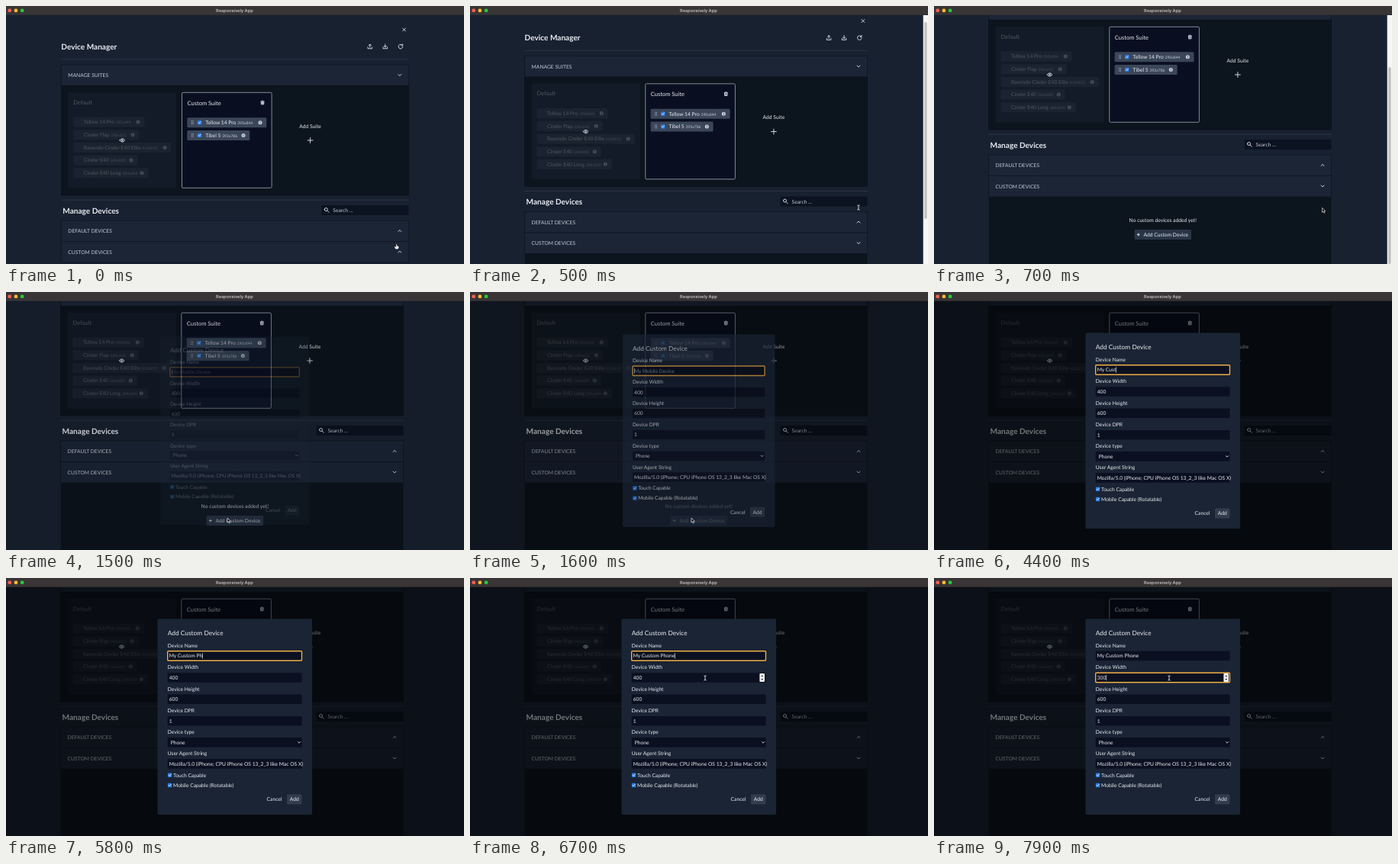
An HTML page for the animation above (8 s loop, 600 by 338 pixels).

```html
<!DOCTYPE html>
<html lang="en">
<head>
<meta charset="utf-8">
<title>Device manager</title>
<style>
  html, body { margin: 0; width: 100%; height: 100%; overflow: hidden; background: #182130; }
  svg { display: block; width: 600px; height: 338px; font-family: Lato, "Open Sans", sans-serif; }
  text { fill: #e8ecf2; white-space: pre; text-rendering: geometricPrecision; }
  .icon { fill: none; stroke: #e4e9f0; stroke-width: .9; stroke-linecap: round; stroke-linejoin: round; }
  .muted { fill: #c3cad5; }
</style>
</head>
<body>
<svg id="stage" viewBox="0 0 600 338"></svg>
<script>
const LOOP = 8000, SCROLL = 86, OPEN_AT = 300, MODAL_AT = 1450, WIDTH_FOCUS = 7000;
const stage = document.getElementById('stage');

// y is the vertical middle of the capitals
const text = (x, y, str, size = 6.72, attrs = '') =>
  `<text x="${x}" y="${y + size * .35}" font-size="${size}" ${attrs}>${str}</text>`;
const box = (x, y, w, h, fill, attrs = '') =>
  `<rect x="${x}" y="${y}" width="${w}" height="${h}" fill="${fill}" ${attrs}/>`;
const icon = (x, y, d, attrs = '') =>
  `<path class="icon" transform="translate(${x} ${y})" d="${d}" ${attrs}/>`;
const chevron = (x, y, down) => icon(x, y, down ? 'M-2-1L0 1 2-1' : 'M-2 1L0-1 2 1');
const check = (x, y) =>
  box(x - 2.7, y - 2.7, 5.4, 5.4, '#2b7de9', 'rx="1"') + icon(x, y, 'M-1.4 .1L-.4 1.2 1.4-1.2', 'stroke="#fff"');

function chip(x, y, w, name, dims, active) {
  const dots = [0, 1, 2, 3, 4, 5].map(i =>
    box(x + 5.6 + i % 2 * 1.8, y - 2.4 + (i >> 1) * 1.9, .9, .9, '#c9d0da')).join('');
  const end = x + w - 8.3;
  return box(x, y - 6.5, w, 13, '#3b4759', 'rx="1.5"') +
    (active ? dots + check(x + 16.2, y) : '') +
    text(x + (active ? 24 : 13.5), y, `${name}<tspan dx="1.8" font-size="5.04" fill="#c3cad5">${dims}</tspan>`) +
    `<circle cx="${end}" cy="${y}" r="2.5" fill="#cbd2dc"/>` +
    box(end - .4, y - .5, .8, 1.9, '#3b4759') + box(end - .4, y - 1.6, .8, .8, '#3b4759');
}

const header = (y, right, label, down) =>
  box(72, y, right - 72, 27.5, '#1b2535', 'stroke="#0e1622" stroke-width=".8"') +
  text(81, y + 13.7, label, 6.72, 'class="muted"') + chevron(right - 11.5, y + 13.5, down);

function page(open) {
  const right = open ? 521 : 527;
  const rule = y => box(72, y, right - 72, .6, '#354153');
  const suite = [
    ['Tellow 14 Pro', '390x844', 93], ['Cinder Flap', '280x653', 86],
    ['Ravendo Cinder E40 Elite', '412x915', 128], ['Cinder E40', '360x800', 84],
    ['Cinder E40 Long', '384x854', 98]
  ].map(([name, dims, w], i) => chip(88, 152 + i * 16.7, w, name, dims)).join('');

  return icon(right - 5.7, 31, 'M-1.9-1.9L1.9 1.9M1.9-1.9L-1.9 1.9') +
    text(72, 53.3, 'Device Manager', 10.08, 'font-weight="700"') +
    icon(right - 50.5, 53, 'M-2.8 1V2.8H2.8V1M0 1V-2.8M-1.6-1.3L0-2.9 1.6-1.3') +
    icon(right - 30.5, 53, 'M-2.8 1V2.8H2.8V1M0-2.9V.9M-1.6-.6L0 1 1.6-.6') +
    icon(right - 10.3, 53, 'M2.3-1.5A2.8 2.8 0 1 0 2.8 .4M2.7-3V-1.2H.9') +
    rule(69.7) +
    header(77, right, 'MANAGE SUITES', true) +
    box(72, 104.5, right - 72, 143.5, '#0c141d', 'stroke="#0a1019" stroke-width=".6"') +
    `<g opacity=".3">${box(81, 113, 142, 125.5, '#222d40', 'rx="1.5"')}${text(88, 126.3, 'Default', 7.56)}${suite}</g>` +
    icon(152, 176, 'M-3.4 0Q0-4.4 3.4 0Q0 4.4-3.4 0M-1 0A1 1 0 1 0 1 0A1 1 0 1 0-1 0') +
    box(230.2, 113.3, 117.6, 125, '#090f20', 'rx="1.5" stroke="#8f99a8" stroke-width=".9"') +
    text(237.2, 127, 'Custom Suite', 7.56) +
    icon(335.7, 126.7, 'M-1.7-1.3V2.2H1.7V-1.3M-2.1-1.5H2.1M-.7-2.4H.7M-.5-.2V1.2M.5-.2V1.2', 'stroke-width=".7"') +
    chip(237, 152.7, 104, 'Tellow 14 Pro', '390x844', true) +
    chip(237, 169.4, 82, 'Tibel 5', '393x786', true) +
    text(398.3, 157.5, 'Add Suite', 6.72, 'text-anchor="middle"') +
    icon(398.3, 176, 'M-3.4 0H3.4M0-3.4V3.4') +
    rule(253.8) +
    text(74, 268, 'Manage Devices', 10.08, 'font-weight="700"') +
    box(right - 114, 261, 114, 13, '#0b1220', 'rx="1.2"') +
    icon(right - 107.2, 267.4, 'M.9 .9L2.9 2.9M-2.9-.9A2 2 0 1 0 1.1-.9A2 2 0 1 0-2.9-.9') +
    text(right - 99, 267.7, 'Search ...', 6.72, 'class="muted"') +
    header(281, right, 'DEFAULT DEVICES', false) +
    header(308.5, right, 'CUSTOM DEVICES', open) +
    (open ? box(72, 336, right - 72, 88, '#0c141d') +
      text(300.2, 367, 'No custom devices added yet!', 6.72, 'text-anchor="middle"') +
      box(263, 379, 74.5, 13, '#293546', 'rx="1.2"') +
      icon(268.2, 385.5, 'M-1.6 0H1.6M0-1.6V1.6', 'stroke-width=".7"') +
      text(275, 385.5, 'Add Custom Device') : '');
}

const field = (y, label, content) =>
  text(211.7, y - 13.4, label) + box(211.7, y - 6.3, 175.8, 12.6, '#0b1020', 'rx="1"') + content;

const modal =
  box(198.5, 53.5, 202.5, 256.5, '#1a2434', 'rx="2"') +
  text(211.7, 72, 'Add Custom Device', 8.4) +
  field(102, 'Device Name', text(213.7, 102, '', 6.72, 'id="name"')) +
  field(130.5, 'Device Width', text(213.7, 130.5, '', 6.72, 'id="width"')) +
  field(158.8, 'Device Height', text(213.7, 158.8, '600')) +
  field(187.2, 'Device DPR', text(213.7, 187.2, '1')) +
  field(215.4, 'Device type', text(215.7, 215.4, 'Phone') +
    icon(384, 215.4, 'M-1.5-.7L0 .8 1.5-.7', 'stroke-width=".7"')) +
  field(243.4, 'User Agent String',
    text(213.7, 243.4, 'Mozilla/5.0 (iPhone; CPU iPhone OS 13_2_3 like Mac OS X)')) +
  check(214.6, 258.2) + text(219, 258.2, 'Touch Capable') +
  check(214.6, 271.5) + text(219, 271.5, 'Mobile Capable (Rotatable)') +
  text(341.6, 290, 'Cancel') +
  box(368, 283.4, 19.5, 13.2, '#313d4d', 'rx="1.2"') + text(371.7, 290, 'Add') +
  `<g id="spinner">${box(379.4, 125, 6.6, 11, '#f2f2f2', 'rx="1"')}
    <path d="M381.2 129.3L382.7 127.2 384.2 129.3ZM381.2 131.9L382.7 134 384.2 131.9Z" fill="#333"/></g>` +
  box(211.7, 0, 175.8, 12.6, 'none', 'id="ring" rx="1" stroke="#f0ad45" stroke-width="1.4"') +
  box(0, 0, .6, 7.4, '#fff', 'id="caret"');

stage.innerHTML = box(0, 0, 600, 338, '#182130') +
  `<g id="closed" transform="translate(.3 0)">${page(false)}</g>
  <g id="open">${page(true)}</g>
  <g id="bar">${box(593.7, 12, 6.3, 326, '#f7f7f7')}${box(595.2, 12, 3.5, 258, '#c1c1c1', 'id="thumb" rx="1.75"')}</g>
  ${box(0, 11, 600, 327, '#000', 'id="shade"')}
  <g id="modal">${modal}</g>
  ${box(0, 0, 600, 11.8, '#393536')}` +
  ['#fe5f57', '#febc2e', '#28c840'].map((c, i) => `<circle cx="${4.8 + i * 8.2}" cy="5.9" r="2.4" fill="${c}"/>`).join('') +
  text(299.4, 6, 'Responsively App', 5.6,
    'text-anchor="middle" style="font-family:Inter,sans-serif;font-weight:600;fill:#c4c1c1"') +
  `<g id="pointer">
    <path id="arrow" d="M0 0V6L1.4 4.8 2.4 7 3.4 6.5 2.4 4.4H4.3Z" fill="#111" stroke="#fff" stroke-width=".6"/>
    <path id="hand" d="M-.6 0Q0-.7.6 0V2L3 2.7V4.8L2.2 6.4H-1.2L-2.8 3.6-2 3-.6 3.8Z" fill="#fff" stroke="#222" stroke-width=".4"/>
    <path id="beam" class="icon" d="M-1.2-3Q0-3 0-2.2Q0-3 1.2-3M0-2.2V2.2M-1.2 3Q0 3 0 2.2Q0 3 1.2 3" stroke-width=".8"/>
  </g>`;

const el = Object.fromEntries([...stage.querySelectorAll('[id]')].map(e => [e.id, e]));
const show = (e, on) => e.setAttribute('visibility', on ? 'visible' : 'hidden');
const last = (keys, t) => keys.filter(k => k[0] <= t).pop();

// linear path through [time, ...values]
function along(keys, t) {
  const i = keys.findIndex(k => k[0] > t);
  if (i < 1) return (i ? keys[keys.length - 1] : keys[0]).slice(1);
  const a = keys[i - 1], b = keys[i], f = (t - a[0]) / (b[0] - a[0]);
  return a.slice(1).map((v, j) => v + (b[j + 1] - v) * f);
}

const scrollKeys = [[400, 0], [500, 11], [600, 55], [700, SCROLL]];
const pointerKeys = [
  [0, 511.5, 312], [250, 511.5, 312], [450, 509, 264], [700, 509, 264], [800, 465, 289],
  [900, 394, 309], [1000, 290, 296], [6450, 290, 296], [6500, 302, 158], [6700, 308, 131]
];
const shapeKeys = [
  [0, 'hand'], [400, 'beam'], [600, 'arrow'], [1000, 'hand'],
  [MODAL_AT, 'arrow'], [2300, ''], [6500, 'beam']
];

const phrase = 'My Custom Phone';
const nameKeys = [[0, ''], [2400, 'M'], [2700, 'My'], [3000, 'My '], [3100, 'My V'], [3400, 'My '],
  ...[3700, 3900, 4100, 4300, 4500, 4700, 5100, 5600, 5800, 5900, 6100, 6300]
    .map((time, i) => [time, phrase.slice(0, i + 4)])];
const widthKeys = [[0, '400'], [7100, '40'], [7200, '4'], [7300, ''], [7500, '3'], [7700, '30'], [7800, '300']];

function draw() {
  const t = performance.now() % LOOP, open = t >= OPEN_AT;
  const [scroll] = along(scrollKeys, t);
  show(el.closed, !open);
  show(el.open, open);
  el.open.setAttribute('transform', `translate(-.4 ${-scroll})`);
  show(el.bar, open && t < MODAL_AT);
  el.thumb.setAttribute('y', 12 + scroll * 326 / 412);

  const p = Math.min(1, Math.max(0, (t - MODAL_AT) / 300)), ease = 1 - (1 - p) ** 1.65;
  el.shade.setAttribute('opacity', ease * .5);
  el.modal.setAttribute('opacity', ease);
  el.modal.setAttribute('transform',
    `translate(299.75 181.75) scale(${.95 + .05 * ease}) translate(-299.75 -181.75)`);

  const name = last(nameKeys, t), width = last(widthKeys, t);
  el.name.textContent = name[1] || 'My Mobile Device';
  el.name.style.fill = name[1] ? '' : '#8c95a4';
  el.width.textContent = width[1];

  const onWidth = t >= WIDTH_FOCUS, y = onWidth ? 130.5 : 102;
  const typed = onWidth ? Math.max(WIDTH_FOCUS, width[0]) : Math.max(MODAL_AT, name[0]);
  const before = onWidth ? el.width : name[1] ? el.name : null;
  el.ring.setAttribute('y', y - 6.3);
  el.caret.setAttribute('x', 213.8 + (before ? before.getComputedTextLength() : 0));
  el.caret.setAttribute('y', y - 3.7);
  show(el.caret, p > 0 && (t - typed) % 1000 < 500);
  show(el.spinner, t >= 6600);

  const shape = last(shapeKeys, t)[1];
  for (const id of ['arrow', 'hand', 'beam']) show(el[id], id === shape);
  el.pointer.setAttribute('transform', `translate(${along(pointerKeys, t).join(' ')})`);
  requestAnimationFrame(draw);
}
draw();
</script>
</body>
</html>
```
